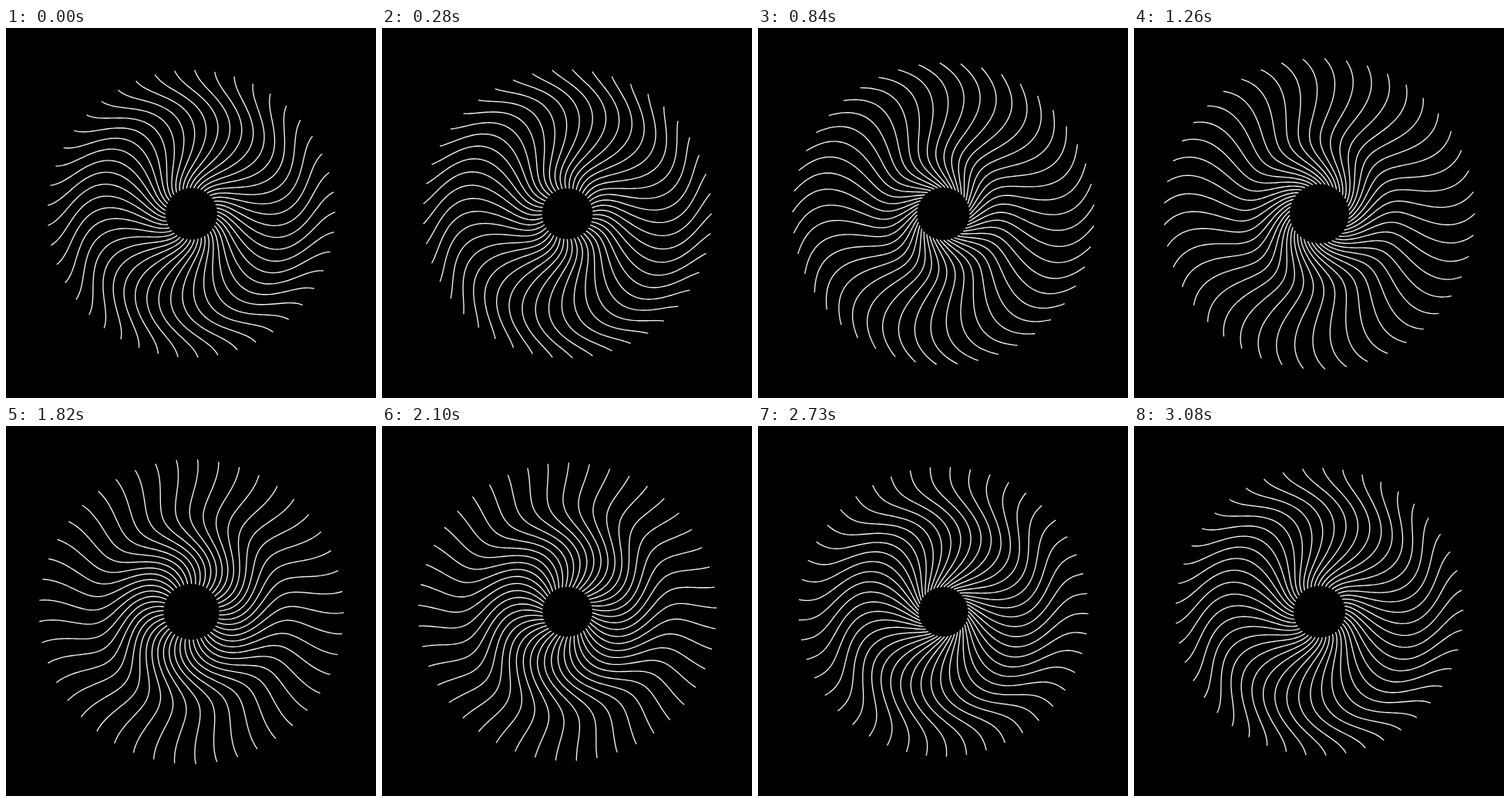
These frames come from a looping animation (480x480 px, 3150 ms). An HTML page:

```html
<!DOCTYPE html>
<html lang="en">
<head>
<meta charset="utf-8">
<title>Swirling rays</title>
<style>
  html, body { margin: 0; width: 100%; height: 100%; overflow: hidden; background: #000; }
  svg { display: block; width: 100vw; height: 100vh; }
</style>
</head>
<body>
<svg viewBox="0 0 480 480">
  <defs><path id="ray" fill="none" stroke="#f4f4f4" stroke-width="1.35" stroke-linejoin="round"/></defs>
  <g id="rays" transform="translate(240.5 241)"></g>
</svg>
<script>
const RAYS = 45, SAMPLES = 64;
const STEP_MS = 70, STEPS = 45;
const INNER = 32, OUTER = 193;
const TWIST = 0.0023; // radians per pixel of radius
const rad = deg => deg * Math.PI / 180;

const ray = document.getElementById('ray');
const rays = document.getElementById('rays');
for (let i = 0; i < RAYS; i++) {
  const use = document.createElementNS('http://www.w3.org/2000/svg', 'use');
  use.setAttribute('href', '#ray');
  use.setAttribute('transform', `rotate(${i * 360 / RAYS})`);
  rays.append(use);
}

// A point on a spiral ray, pushed by a wave that travels outward.
// u runs from 0 (inner end) to 1 (tip); phase is in radians.
function point(u, phase) {
  const r = INNER + (OUTER - INNER) * u;
  const wave = phase - rad(172 + 372 * u);
  const out = r + (3.3 + 4.2 * u) * Math.cos(wave + rad(17))
    + 1.3 * u ** 3 * Math.cos(2 * phase - rad(282));
  const side = (17 - u) * Math.cos(wave);
  const angle = rad(6.25) + TWIST * (OUTER - r) + Math.atan2(side, out);
  const dist = Math.hypot(out, side);
  return [dist * Math.sin(angle), -dist * Math.cos(angle)];
}

function draw(ms) {
  const step = Math.floor(ms / STEP_MS) % STEPS;
  // The last step repeats the first pose.
  const phase = 2 * Math.PI * step / (STEPS - 1);
  const points = Array.from({ length: SAMPLES + 1 }, (_, i) =>
    point(i / SAMPLES, phase).map(v => v.toFixed(2)).join(' '));
  ray.setAttribute('d', 'M' + points.join('L'));
}

let start;
function tick(now) {
  start ??= now;
  draw(now - start);
  requestAnimationFrame(tick);
}
draw(0);
requestAnimationFrame(tick);
</script>
</body>
</html>
```
